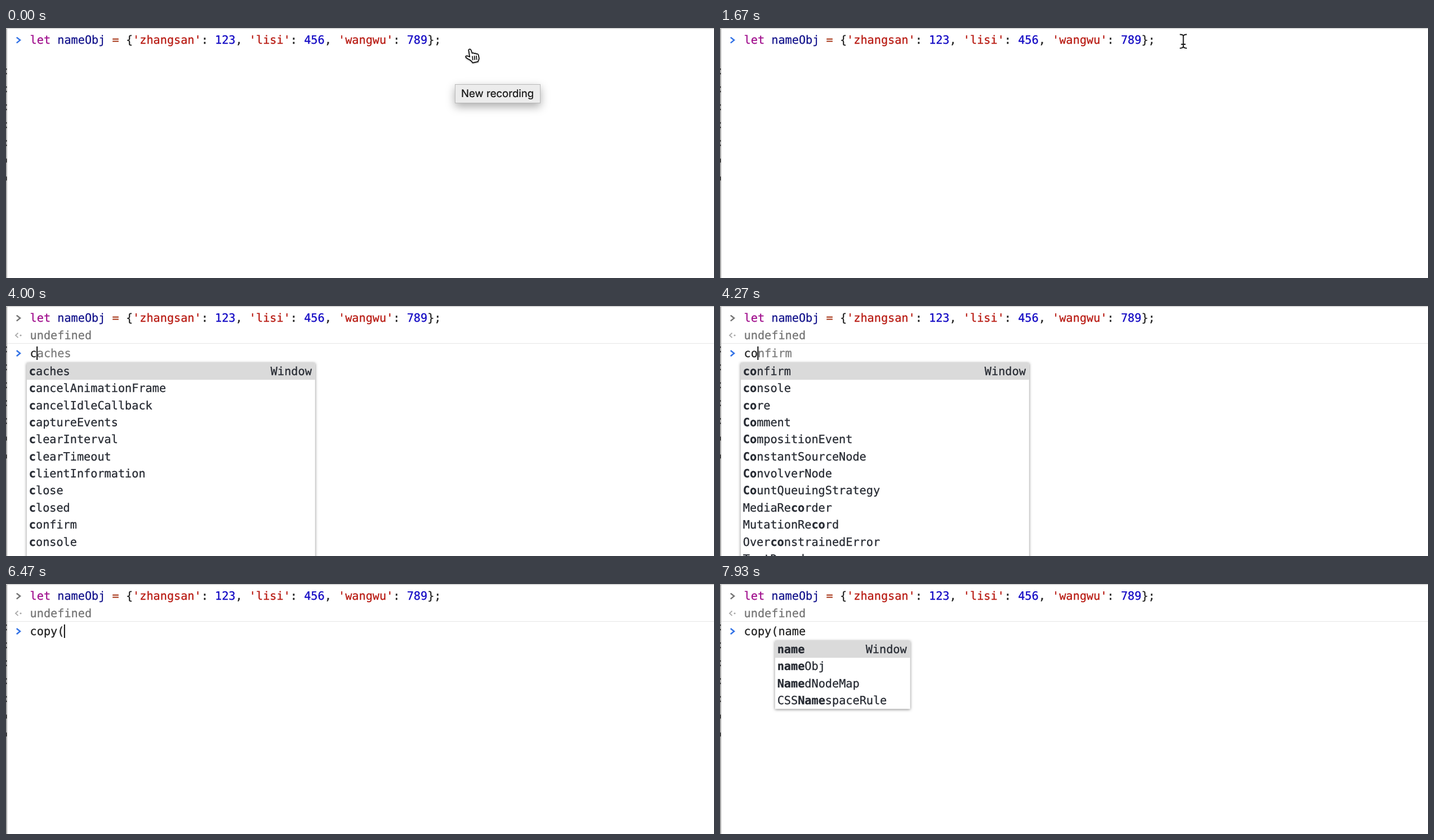
An HTML page for the animation above (8 s loop, 1257 by 445 pixels).

```html
<!DOCTYPE html>
<html lang="en">
<head>
<meta charset="utf-8">
<title>Console typing</title>
<style>
  html, body { margin: 0; width: 100%; height: 100%; overflow: hidden; background: #fff; }
  svg { display: block; width: 1257px; height: 445px; }
  text { white-space: pre; text-rendering: geometricPrecision; }
  .mono text { font: 20.22px "DejaVu Sans Mono", monospace; }
  .mono text, .mono tspan { fill: currentColor; stroke: currentColor; stroke-width: .3px; }
  .popup { filter: drop-shadow(0 1px 2.5px rgba(0, 0, 0, .5)); }
  .tip { filter: drop-shadow(0 6px 8px rgba(0, 0, 0, .33)); }
  .cursor { filter: drop-shadow(0 1px 1px rgba(0, 0, 0, .35)); }
</style>
</head>
<body>
<svg viewBox="0 0 1257 445" xmlns="http://www.w3.org/2000/svg">
  <rect width="1257" height="445" fill="#fff"/>
  <rect width="1257" height="1.5" fill="#cdcdcd"/>
  <g id="edge"></g>
  <g id="page" class="mono"></g>
  <rect id="caret" width="2" height="24" fill="#111"/>
  <g id="tip">
    <rect class="tip" x="797.5" y="100.5" width="151" height="33" fill="#ececec" stroke="#b9b9b9"/>
    <text x="808" y="123.3" font-family="Inter, sans-serif" font-size="18.6" fill="#111" stroke="#111" stroke-width=".2">New recording</text>
  </g>
  <g id="hand" class="cursor" stroke="#111" stroke-width="1.7" stroke-linejoin="round" stroke-linecap="round">
    <path fill="#fff" d="M821.5 40c-.8-2 2.6-3.6 3.8-1.2l2.4 6.2c1-1.2 3.2-.8 3.6.6 1.2-1 3.2-.6 3.6.8 1.6-.8 3.4 0 3.8 1.8l1 5c.6 3-1.4 4-1.6 6.6l-9.6 2c-1.4-2.6-4-4.4-7.2-6.2-2-1.2-5-2.4-5.2-4.4 0-1.6 2.4-2.2 4.4-1l2.8 1.2z"/>
    <path fill="none" d="M828 50.5l.8 6.2M831.6 50.2l.7 6.2M835 49.8l.7 6.2"/>
  </g>
  <path id="arrow" class="cursor" fill="#000" stroke="#fff" stroke-width="1.6" d="M0 0V22L5.2 17.4 9.2 26.8 12.8 25.2 8.9 16H15.6Z"/>
  <g id="beam" fill="none">
    <path id="beamHalo" stroke="#fff" stroke-width="4"/>
    <path id="beamLine" stroke="#1a1a1a" stroke-width="2"/>
  </g>
</svg>
<script>
const LOOP = 8000, CHAR = 12.173, LEFT = 42.6, ROW = 30.35, POPUP_TOP = 101;
const ENTER = 3330;
const $ = id => document.getElementById(id);

const CODE = [
  ["let", "#a00d8c"], [" nameObj", "#14148c"], [" =", "#a93a1c"], [" {", "#222"],
  ["'zhangsan'", "#b81a12"], [": ", "#222"], ["123", "#1208c4"], [", ", "#222"],
  ["'lisi'", "#b81a12"], [": ", "#222"], ["456", "#1208c4"], [", ", "#222"],
  ["'wangwu'", "#b81a12"], [": ", "#222"], ["789", "#1208c4"], ["};", "#222"]
];

// Suggestion lists: popup width, word column, rows; rows with ">" come from history.
const LISTS = {
  c: [513, 0, "caches cancelAnimationFrame cancelIdleCallback captureEvents clearInterval clearTimeout clientInformation close closed confirm console core"],
  co: [513, 0, "confirm console core Comment CompositionEvent ConstantSourceNode ConvolverNode CountQueuingStrategy MediaRecorder MutationRecord OverconstrainedError TextDecoder"],
  cop: [172, 0, "copy copy copy copy >copy(obj) >copy(z)"],
  copy: [172, 0, "copy copy copy copy >copy(obj) >copy(z)"],
  n: [484, 5, "name nameObj navigator NaN NamedNodeMap NavigationPreloadManager Navigator NetworkInformation Node NodeFilter NodeIterator NodeList"],
  na: [375, 5, "name nameObj navigator NaN NamedNodeMap NavigationPreloadManager Navigator CSSNamespaceRule DynamicsCompressorNode PerformanceNavigation PerformanceNavigationTiming"],
  nam: [241, 5, "name nameObj NamedNodeMap CSSNamespaceRule"],
  name: [241, 5, "name nameObj NamedNodeMap CSSNamespaceRule"]
};

// Time, typed text, query of the open popup
const KEYS = [
  [ENTER, "", ""], [3800, "c", ""], [3870, "c", "c"], [4200, "co", "c"], [4240, "co", "co"],
  [5270, "cop", "co"], [5330, "cop", "cop"], [5470, "copy", "cop"], [5530, "copy", "copy"],
  [6270, "copy(", ""], [6800, "copy(n", ""], [6870, "copy(n", "n"],
  [7130, "copy(na", "n"], [7200, "copy(na", "na"], [7270, "copy(nam", "na"],
  [7330, "copy(nam", "nam"], [7400, "copy(name", "nam"], [7460, "copy(name", "name"]
];

const CARET_OFF = [[0, 800], [1270, 1800], [2330, 2870], [4730, 5270], [6000, 6270], [7930, 8000]];

const rect = (x, y, w, h, fill) => `<rect x="${x}" y="${y}" width="${w}" height="${h}" fill="${fill}"/>`;
const text = (x, y, body, color, extra = "") => `<text x="${x}" y="${y}" color="${color}" ${extra}>${body}</text>`;
const span = (body, color) => `<tspan color="${color}">${body}</tspan>`;
const chevron = (x, y, color, s = 1) =>
  `<path d="M${x} ${y - 5 * s}l${6.2 * s} ${5 * s}-${6.2 * s} ${5 * s}" fill="none" stroke="${color}" stroke-width="2.5"/>`;

function mark(word, query) {
  const i = word.toLowerCase().indexOf(query);
  if (i < 0) return word;
  const end = i + query.length;
  return `${word.slice(0, i)}<tspan font-weight="bold">${word.slice(i, end)}</tspan>${word.slice(end)}`;
}

function popup(query) {
  const [width, col, words] = LISTS[query];
  const rows = words.split(" ");
  const x = LEFT + col * CHAR - 5.8;
  let out = `<g class="popup">${rect(x, POPUP_TOP, width - 1, rows.length * ROW, "#fff")}</g>`;
  out += rect(x, POPUP_TOP, width - 1, ROW, "#dadada");
  rows.forEach((row, i) => {
    const old = row[0] === ">", y = POPUP_TOP + i * ROW;
    if (old) out += rect(x, y, width - 1, ROW, "#f6f6f6") + chevron(x + 9, y + 15.5, "#3b78e0", .95);
    out += text(x + (old ? 20.4 : 4), y + 22, mark(old ? row.slice(1) : row, query), "#272b33");
  });
  if (!query.startsWith("cop"))
    out += text(x + width - 7, POPUP_TOP + 22, "Window", "#272b33", 'text-anchor="end"');
  return out;
}

function drawPage(key) {
  const code = CODE.map(part => span(...part)).join("");
  let out = chevron(18.8, 21.6, key ? "#747474" : "#3272e6") + text(LEFT, 28.4, code, "#222");
  if (!key) return out;
  const [, typed, query] = key;
  const word = typed.slice(typed.indexOf("(") + 1);
  const first = query && word ? LISTS[query][2].split(" ").find(w => w.startsWith(word)) : "";
  const hint = first ? first.slice(word.length) : "";
  out += '<path d="M21.5 48l-4.5 4.2 4.5 4.2" fill="none" stroke="#a9a9a9" stroke-width="1.8"/>';
  out += '<circle cx="26" cy="52.2" r="1.5" fill="#a9a9a9"/>';
  out += text(LEFT, 58.7, "undefined", "#747474") + rect(2, 66, 1255, 1.2, "#e9e9e9");
  out += chevron(18.8, 84.3, "#3272e6");
  out += text(LEFT, 90.8, typed + span(hint, "#7c7c7c"), "#222");
  return out + (query ? popup(query) : "");
}

// Window behind: a sliver of its letters shows at the left edge.
function drawEdge(color) {
  let out = rect(0, 1, 1, 444, "#c4c4c4") + rect(1, 1, 1, 444, color);
  for (let i = 0; i < 7; i++) {
    const y = 77 + i * 31.9;
    out += i < 5 ? rect(0, y - 5, 1.6, 2.5, "#333") + rect(0, y + 3, 1.6, 2.5, "#333")
                 : rect(0, y - 4, 1.6, 7, "#333");
  }
  return out;
}

const beam = "M-6.2-12c4 0 6.2 1 6.2 3.4V9c0 2.4-2.2 3.4-6.2 3.4M6.2-12C2.2-12 0-11 0-8.6V9c0 2.4 2.2 3.4 6.2 3.4M-4 5.5H4";
$("beamHalo").setAttribute("d", beam);
$("beamLine").setAttribute("d", beam);

const show = (id, on) => $(id).setAttribute("opacity", +on);
const move = (id, x, y) => $(id).setAttribute("transform", `translate(${x} ${y})`);
let shownKey, shownEdge;

function render(t) {
  const key = KEYS.filter(k => t >= k[0]).pop() || null;
  if (key !== shownKey) $("page").innerHTML = drawPage(shownKey = key);

  const edge = t < 700 ? "#a0a0a0" : "#8a8a8a";
  if (edge !== shownEdge) $("edge").innerHTML = drawEdge(shownEdge = edge);

  show("caret", !CARET_OFF.some(([a, b]) => t >= a && t < b));
  $("caret").setAttribute("x", key ? LEFT + key[1].length * CHAR - .6 : t < 1800 ? 175 : 773);
  $("caret").setAttribute("y", key ? 72 : 10);

  show("tip", t < 670 ? 1 : t < 730 ? .5 : 0);
  show("hand", t < 670);
  show("arrow", t >= 670 && t < 1470 || t >= ENTER && t < 3800);
  show("beam", t >= 1470 && t < ENTER);

  const p = Math.min(1, Math.max(0, (t - 1470) / 260));
  const y = 31 - 7.8 * p * (2 - p);
  move("arrow", 822, t < 1470 ? 30 : 23);
  move("beam", 822.6, y);
}

const start = performance.now();
function tick(now) {
  render(Math.max(0, now - start) % LOOP);
  requestAnimationFrame(tick);
}
render(0);
requestAnimationFrame(tick);
</script>
</body>
</html>
```
